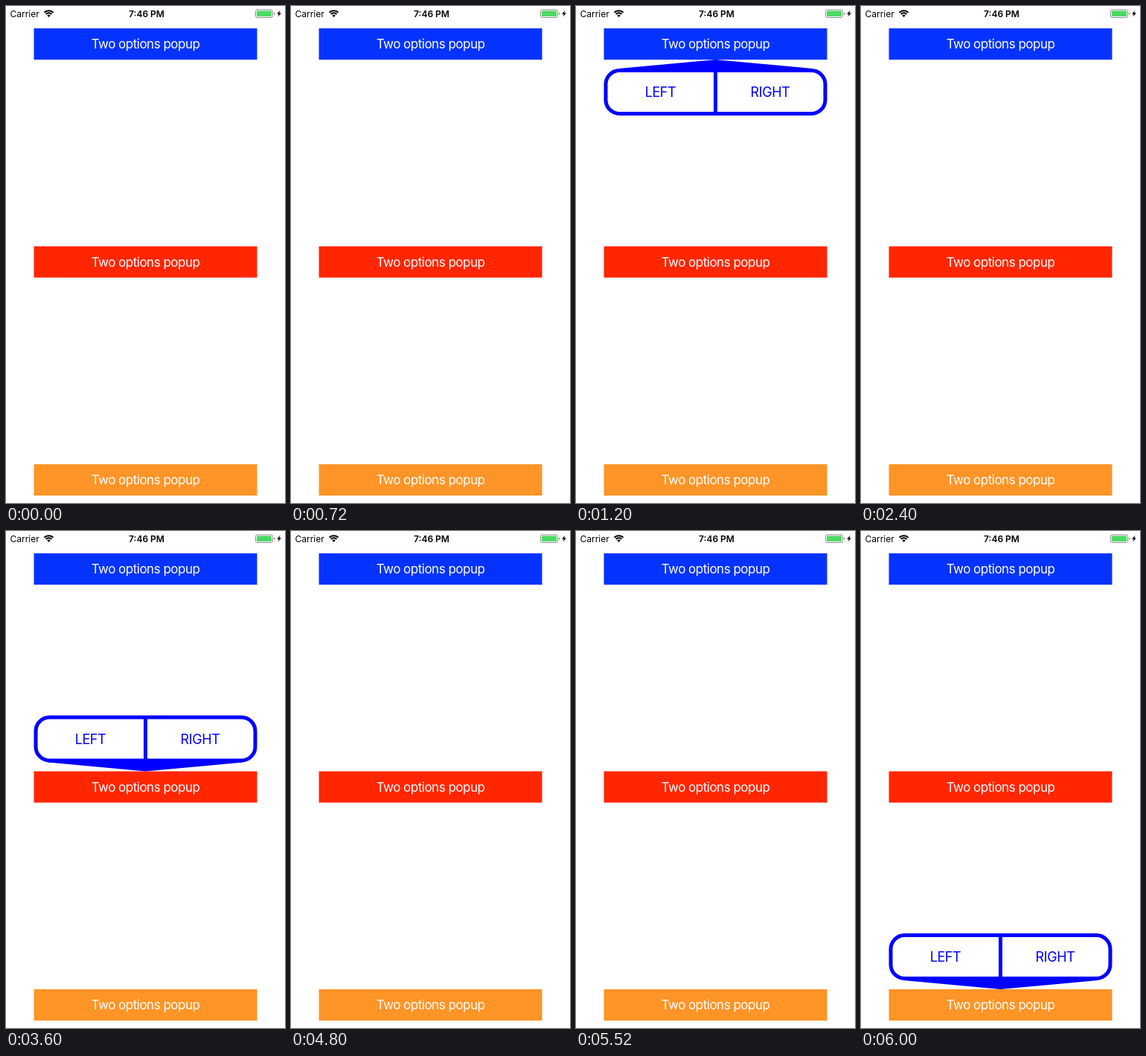
An HTML page that plays this animation: 375x667 px, repeating every 7200 ms.

```html
<!DOCTYPE html>
<html lang="en">
<head>
<meta charset="utf-8">
<title>Two options popup</title>
<style>
  html, body { margin: 0; width: 100%; height: 100%; overflow: hidden; background: #fff; }
  svg { display: block; width: 375px; height: 667px; font-family: Inter, "Liberation Sans", sans-serif; }
  .button { fill: #fff; font-size: 17px; letter-spacing: -.5px; text-anchor: middle; }
  .option { fill: #00f; font-size: 18px; letter-spacing: -.4px; text-anchor: middle; }
  .status { font-size: 12px; }
</style>
</head>
<body>
<svg viewBox="0 0 375 667">
  <g class="status">
    <text x="5.5" y="14.5">Carrier</text>
    <text x="189" y="14.5" text-anchor="middle" font-weight="600">7:46 PM</text>
  </g>

  <!-- Wi-Fi -->
  <g fill="none" stroke="#000" stroke-width="2.1">
    <path d="M51.5 8.7a8.4 8.4 0 0 1 12 0"/>
    <path d="M53.7 10.9a5.3 5.3 0 0 1 7.6 0"/>
    <path d="M57.5 15l-2.2-2.3a3.1 3.1 0 0 1 4.4 0z" fill="#000" stroke="none"/>
  </g>

  <!-- Battery -->
  <rect x="335.5" y="5" width="23" height="10.5" rx="2.4" fill="#fff" stroke="#8c8c8c"/>
  <rect x="337" y="6.5" width="20" height="7.5" rx="1.1" fill="#4cd964"/>
  <path d="M360 8.5q1.5 .4 1.5 1.75t-1.5 1.75z" fill="#8c8c8c"/>
  <path d="M368.6 5.8l-4.6 5h2.7l-1.4 3.8 4.8-5.2h-2.8z"/>

  <g id="buttons"></g>

  <g id="popup">
    <path id="arrow" fill="#00f"/>
    <g id="box">
      <rect x="40" y="2.5" width="295" height="58" rx="18.5" fill="#fff" stroke="#00f" stroke-width="5"/>
      <path d="M187.5 2V61" stroke="#00f" stroke-width="5"/>
      <text class="option" x="113.5" y="38">LEFT</text>
      <text class="option" x="261" y="38">RIGHT</text>
    </g>
  </g>
</svg>
<script>
const STEP = 1200;
const BOX_HEIGHT = 63;
const ARROW_HEIGHT = 12;
const BUTTON_HEIGHT = 42;
const buttons = [
  { top: 30, color: "#0433ff", below: true },
  { top: 322.5, color: "#ff2600", below: false },
  { top: 615, color: "#ff9427", below: false }
];
const byId = id => document.getElementById(id);

byId("buttons").innerHTML = buttons.map(({ top, color }) => `
  <rect x="37.5" y="${top}" width="300" height="${BUTTON_HEIGHT}" fill="${color}"/>
  <text class="button" x="187.5" y="${top + 27}">Two options popup</text>`).join("");

function placePopup({ top, below }) {
  const tip = below ? top + BUTTON_HEIGHT : top;
  const base = below ? tip + ARROW_HEIGHT : tip - ARROW_HEIGHT;
  const inner = below ? base + 2 : base - 2;
  const boxTop = below ? base : base - BOX_HEIGHT;
  byId("arrow").setAttribute("d", `M187.5 ${tip}L318 ${base}V${inner}H57V${base}z`);
  byId("box").setAttribute("transform", `translate(0 ${boxTop})`);
}

// Each button in turn rests closed for one step, then shows its popup for one.
function draw() {
  const step = Math.floor(performance.now() / STEP) % (buttons.length * 2);
  const open = step % 2 === 1;
  byId("popup").style.display = open ? "" : "none";
  if (open) placePopup(buttons[(step - 1) / 2]);
  requestAnimationFrame(draw);
}
draw();
</script>
</body>
</html>
```
